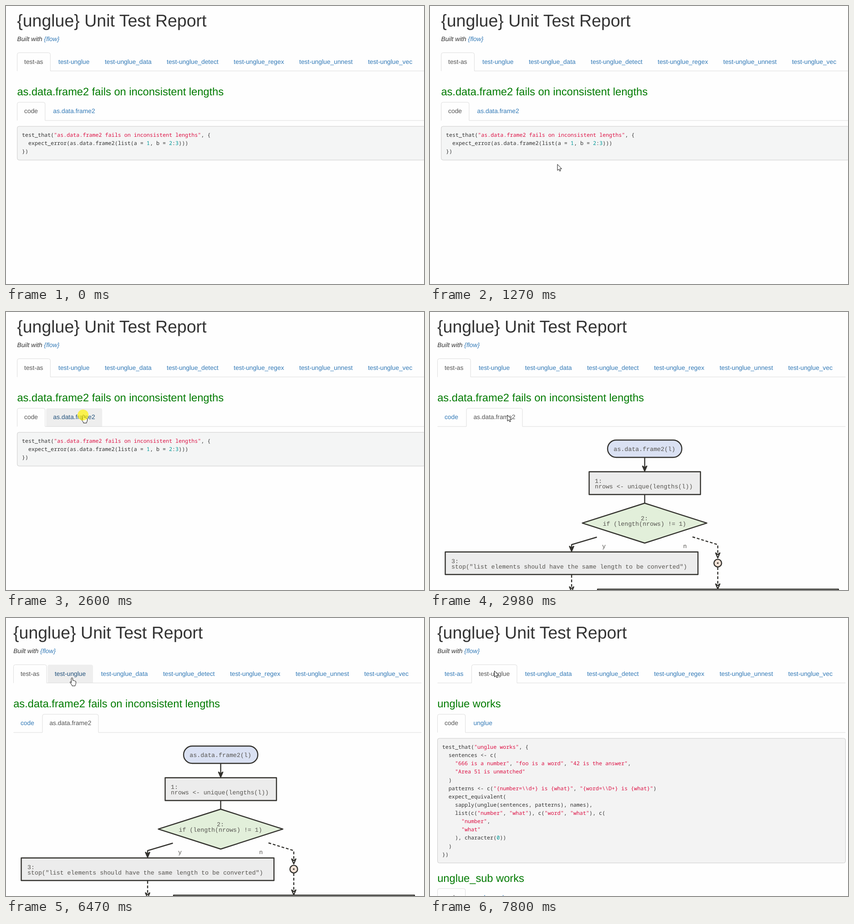
These frames come from a looping animation (918x610 px, 8 s). An HTML page:

```html
<!DOCTYPE html>
<html lang="en">
<head>
<meta charset="utf-8">
<title>Unit Test Report</title>
<style>
html, body { margin: 0; width: 100%; height: 100%; overflow: hidden; background: #fefefe; }
svg { display: block; width: 918px; height: 610px; }
text { white-space: pre; text-rendering: geometricPrecision; font: 13.8px "Liberation Sans", Arial, sans-serif; fill: #333; }
.title { font-size: 37.5px; }
.built { font-style: italic; }
.head { font-size: 23.67px; fill: #007a00; }
.link { fill: #337ab7; }
.over { fill: #23527c; }
.on { fill: #555; }
.code { font: 11.71px "Noto Sans Mono", "DejaVu Sans Mono", monospace; }
.str { fill: #dd1144; }
.num { fill: #009999; }
.flow { font: 13.28px "Liberation Mono", "Courier New", monospace; fill: #55534f; }
.mid { text-anchor: middle; }
.ink { stroke: #33322e; stroke-width: 2.4; fill: none; stroke-linejoin: round; }
.dash { stroke-dasharray: 6 4; }
</style>
</head>
<body>
<svg viewBox="0 0 918 610">
  <g id="page"></g>
  <path id="arrow" d="M0 0V13.4L3 10.6 5 15 7.1 14.1 5.2 9.8H9.4Z" fill="#fff" stroke="#111" stroke-width="1"/>
  <path id="hand" d="M-1.6 11V1.4Q-1.6 0 0 0T1.6 1.4V5.6Q3.2 5 4 6.2 5.8 5.7 6.4 7 8.5 6.7 8.5 8.6V12Q8.5 14 7 16V17.6H0V16L-4 10.6Q-5 8.6 -3.4 8.4 -2.3 8.6 -1.6 10Z" fill="#fff" stroke="#111" stroke-width="1"/>
  <circle id="click" r="12" fill="#fff200" opacity=".68"/>
</svg>
<script>
const LOOP = 8000, LEFT = 16.5, RIGHT = 912.5, BG = '#fefefe';
const $ = id => document.getElementById(id);
const esc = s => s.replace(/&/g, '&amp;').replace(/</g, '&lt;');
const text = (x, y, cls, s) => `<text x="${x}" y="${y}" class="${cls}">${esc(s)}</text>`;

const mainTabs = {
  names: ['test-as', 'test-unglue', 'test-unglue_data', 'test-unglue_detect',
    'test-unglue_regex', 'test-unglue_unnest', 'test-unglue_vec'],
  xs: [16.5, 91.5, 193.3, 329.5, 476.5, 620.5, 771.3, 902]
};
const subTabs = (name, end) => ({ names: ['code', name], xs: [LEFT, 80, end] });

function tabBar({ names, xs }, y, active, hover) {
  const base = y + 40;
  let out = `<path d="M${LEFT} ${base}H${RIGHT}" stroke="#ddd"/>`;
  names.forEach((name, i) => {
    const x = xs[i], r = xs[i + 1] - 2.3;
    const shape = `M${x} ${base}V${y + 4}q0 -4 4 -4H${r - 4}q4 0 4 4V${base}`;
    if (i === active) out += `<path d="${shape}v1H${x}Z" fill="${BG}"/><path d="${shape}" fill="none" stroke="#ddd"/>`;
    if (i === hover) out += `<path d="${shape}Z" fill="#eee"/><path d="M${x} ${base}H${r}" stroke="#ddd"/>`;
    out += text(x + 15.4, y + 24.2, i === active ? 'on' : i === hover ? 'over' : 'link', name);
  });
  return out;
}

function codeBox(bottom, fill, lines) {
  const paint = s => esc(s).replace(/"[^"]*"|\b\d+\b/g,
    m => `<tspan class="${m[0] === '"' ? 'str' : 'num'}">${m}</tspan>`);
  return `<rect x="${LEFT}" y="264" width="${RIGHT - LEFT}" height="${bottom - 264}" rx="4" fill="${fill}" stroke="#ccc"/>` +
    lines.map((s, i) => `<text class="code" x="26.8" y="${287 + i * 18.13}">${paint(s)}</text>`).join('');
}

const box = (x, y, w, h, fill, rx = 0) =>
  `<rect class="ink" x="${x}" y="${y}" width="${w}" height="${h}" rx="${rx}" style="fill:${fill}"/>`;
const line = (d, dash) => `<path class="ink ${dash ? 'dash' : ''}" d="${d}"/>`;
const tip = (x, y, fill) =>
  `<path class="ink" d="M${x} ${y}l-4.6 -10.8 4.6 3.4 4.6 -3.4Z" style="fill:${fill}"/>`;

function chart() {
  const dark = '#33322e', gray = '#ececec';
  return line('M471.5 319V342') + tip(471.5, 349, dark) +
    box(390, 281, 163, 38, '#dae1f3', 19) + text(471, 304.5, 'flow mid', 'as.data.frame2(l)') +
    line('M471.5 400V420') +
    box(349.5, 350.5, 244.5, 50, gray) +
    text(362, 374.5, 'flow', '1:') + text(362, 386.5, 'flow', 'nrows <- unique(lengths(l))') +
    `<path class="ink" d="M334.5 463.2L471.5 419.5 608 463.2 471.5 507Z" style="fill:#e2efda"/>` +
    text(471, 456.5, 'flow mid', '2:') + text(471, 468.5, 'flow mid', 'if (length(nrows) != 1)') +
    line('M366.5 494L311 510.5V518') + tip(311, 525, dark) + text(378, 517.5, 'flow', 'y') +
    line('M576.5 493.5L632 510.5V531', true) + tip(632, 539.5, BG) + text(556, 517.5, 'flow', 'n') +
    `<circle class="ink" cx="632" cy="551" r="8.4" style="fill:#f3e2d6"/><circle cx="632" cy="551" r="1.8" fill="${dark}"/>` +
    line('M632 560V600', true) + tip(632, 607.5, BG) +
    box(33.5, 526.5, 555, 49.5, gray) +
    text(47, 550.5, 'flow', '3:') +
    text(47, 562.5, 'flow', 'stop("list elements should have the same length to be converted")') +
    line('M311 577V606', true) + tip(311, 614, BG) +
    box(368, 608.3, 529, 50, gray);
}

const unglueCode = [
  'test_that("unglue works", {',
  '  sentences <- c(',
  '    "666 is a number", "foo is a word", "42 is the answer",',
  '    "Area 51 is unmatched"',
  '  )',
  '  patterns <- c("{number=\\\\d+} is {what}", "{word=\\\\D+} is {what}")',
  '  expect_equivalent(',
  '    sapply(unglue(sentences, patterns), names),',
  '    list(c("number", "what"), c("word", "what"), c(',
  '      "number",',
  '      "what"',
  '    ), character(0))',
  '  )',
  '})'
];
const frameTitle = 'as.data.frame2 fails on inconsistent lengths';

function build(page, hover) {
  let out = text(16, 45, 'title', '{unglue} Unit Test Report') +
    `<text class="built" x="16.3" y="77">Built with <tspan class="link">{flow}</tspan></text>` +
    tabBar(mainTabs, 102.5, page === 2 ? 1 : 0, page === 1 && hover ? 1 : -1);
  if (page < 2) {
    out += text(16.2, 196, 'head', frameTitle) +
      tabBar(subTabs('as.data.frame2', 205.3), 211.2, page, page === 0 && hover ? 1 : -1);
  }
  if (page === 0) {
    out += codeBox(338, '#f4f5f5', [
      `test_that("${frameTitle}", {`,
      '  expect_error(as.data.frame2(list(a = 1, b = 2:3)))',
      '})'
    ]);
  } else if (page === 1) {
    out += chart();
  } else {
    out += text(16.2, 196, 'head', 'unglue works') +
      tabBar(subTabs('unglue', 155), 211.2, 0, -1) +
      codeBox(537.5, '#f3f3f3', unglueCode) +
      text(16.2, 579, 'head', 'unglue_sub works') +
      tabBar(subTabs('unglue_sub', 182), 593.7, 0, -1);
  }
  return `<g transform="translate(${page ? 0 : 8.2} 0)">${out}</g>`;
}

const out = p => u => 1 - (1 - u) ** p;
const glide = u => { const v = u ** 0.78; return v * v * (3 - 2 * v); };

// Pointer moves: start, end, number of held steps, from, to, easing per axis
const moves = [
  [500, 960, 7, [735, 597], [471, 471], out(1.6), out(1.6)],
  [1190, 1970, 11, [471, 471], [176, 236], out(5.2), out(3.72)],
  [2050, 2200, 3, [176, 236], [170, 226], out(1), out(1)],
  [5860, 6640, 11, [169.5, 226], [141.5, 118], glide, glide],
  [6720, 6720, 1, [141.5, 118], [141.5, 116], out(1), out(1)]
];

function pointer(t) {
  let pos = null;
  for (const [a, b, n, from, to, ex, ey] of moves) {
    if (t < a) break;
    const gap = n > 1 ? (b - a) / (n - 1) : 1;
    const u = Math.min(1, (Math.floor((t - a) / gap + 0.02) + 1) / n);
    pos = [from[0] + (to[0] - from[0]) * ex(u), from[1] + (to[1] - from[1]) * ey(u)];
  }
  return pos;
}

let shown = '';
function place(id, pos) {
  $(id).setAttribute('display', pos ? 'inline' : 'none');
  if (pos) $(id).setAttribute('transform', `translate(${pos[0].toFixed(2)} ${pos[1].toFixed(2)})`);
}

function render(t) {
  const page = t < 2980 ? 0 : t < 7800 ? 1 : 2;
  const pos = pointer(t);
  const hover = !!pos && (page === 0 ? pos[1] < 251 : page === 1 && pos[1] < 142);
  const key = page + '-' + hover;
  if (key !== shown) {
    $('page').innerHTML = build(page, hover);
    shown = key;
  }
  place('arrow', hover ? null : pos);
  place('hand', hover ? pos : null);
  const pressed = (t >= 2600 && t < 2980) || (t >= 7420 && t < 7800);
  place('click', pressed ? [pos[0] - 0.8, pos[1]] : null);
}

const begin = performance.now();
function tick() {
  render((performance.now() - begin) % LOOP);
  requestAnimationFrame(tick);
}
tick();
</script>
</body>
</html>
```
